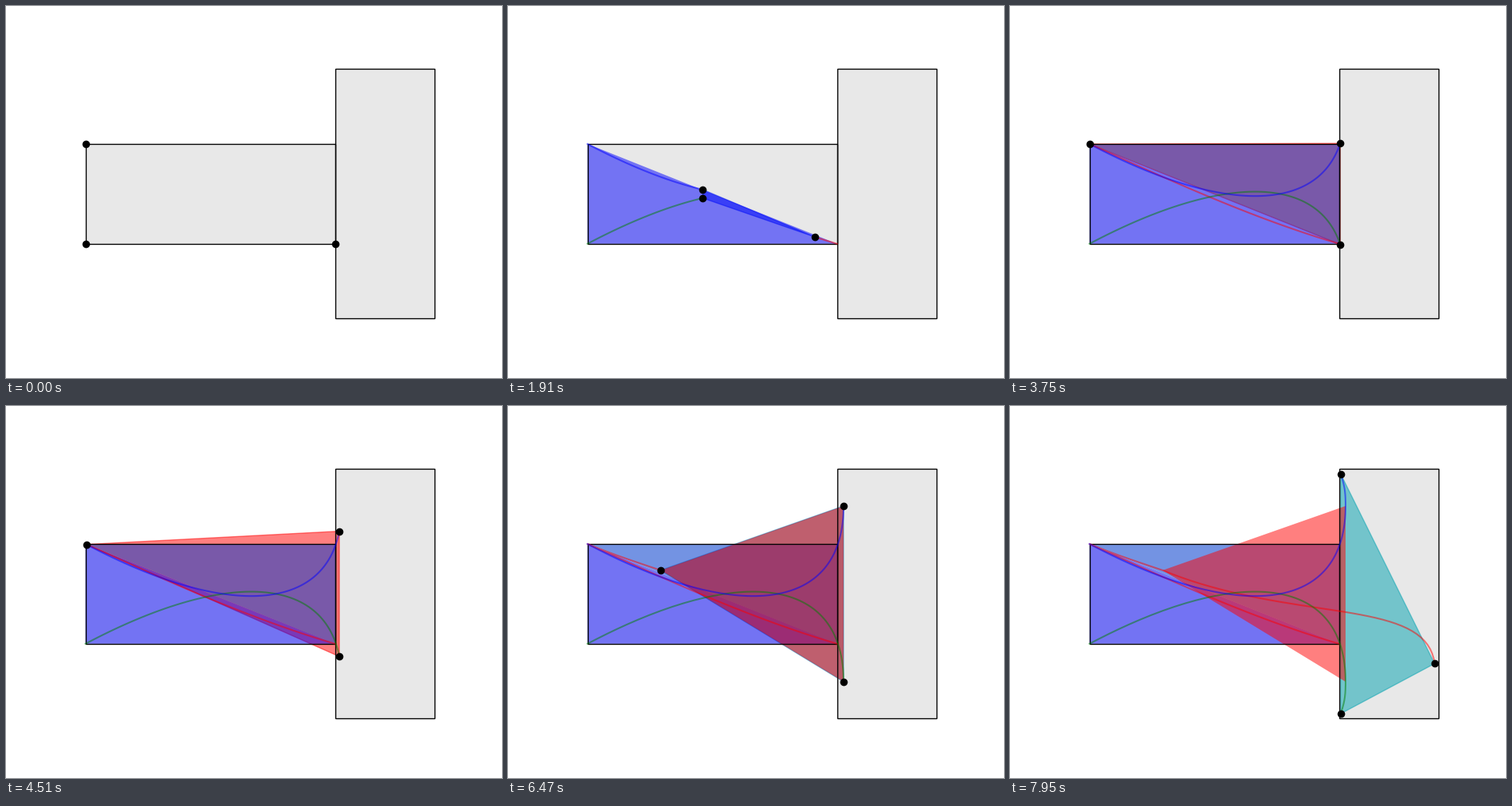
Animation, 640 px wide and 480 px high, one loop 7990 ms. Source, as a matplotlib script:

```python
import numpy as np
import matplotlib.pyplot as plt
from matplotlib.animation import FuncAnimation
from matplotlib.patches import Polygon, Rectangle

W, H = 640, 480
LOOP, TICK, STEP = 7990, 10, 40
FADE_END, MOVE_START = 360, 910
STAGE, STAGES = 70, 4            # steps per stage, stages in the full run
UNIT = 496 / 7.7
LEFT, MID = 80 + 0.35 * UNIT, 242.4
GREY = "#e8e8e8"


def px(x, y):
    """Plan coordinates to stage pixels."""
    return LEFT + x * UNIT, MID + (1 - y) * UNIT


def ease(keys, phases, at):
    """Monotone smooth curve through a few (key, phase) points."""
    keys, phases = np.array(keys), np.array(phases)
    h = np.diff(keys)
    s = np.diff(phases) / h
    m = np.r_[0, 2 * s[:-1] * s[1:] / (s[:-1] + s[1:]), s[-1]]
    i = np.clip(np.searchsorted(keys, at, "right") - 1, 0, len(h) - 1)
    u = (at - keys[i]) / h[i]
    rise = u * u * (3 - 2 * u)
    bend = u * (1 - u) * ((1 - u) * m[i] - u * m[i + 1])
    return phases[i] + rise * h[i] * s[i] + bend * h[i]


def bezier_chain(points, phase):
    """Cubic curves joined end to end; each takes one unit of phase."""
    p = np.array(points, float)
    i = np.clip(phase.astype(int), 0, (len(p) - 1) // 3 - 1)
    t = (phase - i)[:, None]
    a, b, c, d = (p[3 * i + n] for n in range(4))
    return ((1 - t)**3 * a + 3 * t * (1 - t)**2 * b
            + 3 * t**2 * (1 - t) * c + t**3 * d)


steps = np.arange((LOOP - MOVE_START) // STEP + 1)
keys = (0, 26, 58, STAGE, 91, 2 * STAGE, 177)
top = bezier_chain(
    [(0, 2), (3, 0.41), (5.13, 0.616), (5.13, 2.76),
     (5.13, 3.1), (5.1, 3.2), (5, 3.5)],
    ease(keys, (0, 0.283, 0.72, 0.86, 0.915, 1, 1.88), steps))
low = top * [1, -1] + [0, 2]
tip = bezier_chain(
    [(5, 0), (3.3, 0.5), (1.7, 1.23), (0, 2),
     (0.5, 1.79), (1, 1.63), (1.466, 1.472),
     (4.2, 0.35), (7, 1), (6.92, -0.6)],
    ease(keys, (0, 0.087, 0.94, 1, 1.015, 2, 2.955), steps))
tracks = [np.column_stack(px(*track.T)) for track in (tip, low, top)]
winter = plt.get_cmap("winter")

fig = plt.figure(figsize=(W / 100, H / 100), dpi=100, facecolor="white")
ax = fig.add_axes([0, 0, 1, 1])
ax.set_xlim(0, W)
ax.set_ylim(H, 0)
ax.axis("off")

for x, y, w, h in ((0, 0, 5, 2), (5, -1.5, 2, 5)):
    box = (px(x, y + h), w * UNIT, h * UNIT)
    ax.add_patch(Rectangle(*box, fc=GREY, ec="none", zorder=1))
    ax.add_patch(Rectangle(*box, fc="none", ec="black", lw=1, zorder=1.8))


def triangle(points, color, width, z):
    return ax.add_patch(Polygon(points, closed=True, color=color, lw=width,
                                alpha=0.5, zorder=z))


mover = triangle([t[0] for t in tracks], "blue", 1, 1.1)
first = triangle([px(0, 0), px(0, 2), px(5, 0)], "blue", 0, 1.2)
second = triangle([px(0, 2), px(5, 2), px(5, 0)], winter(1 / STAGES), 0, 1.3)
third = triangle([t[2 * STAGE] for t in tracks], "red", 0, 1.4)

trails = [ax.plot([], [], color=c, lw=1.5, alpha=0.5, zorder=2)[0]
          for c in ("red", "green", "blue")]
dots, = ax.plot([], [], "ko", ms=6, zorder=3)


def draw(frame):
    t = frame * TICK
    k = 0 if t < MOVE_START else (t - MOVE_START) // STEP + 1
    k = min(k, len(steps) - 1)
    fade = 0.5 * min(1, t // STEP * STEP / FADE_END)
    corners = np.array([track[k] for track in tracks])

    outside = STAGE <= k < 2 * STAGE
    mover.set_xy(corners)
    mover.set_color("red" if outside else winter(k / (STAGE * STAGES)))
    mover.set_alpha(fade)
    first.set_alpha(fade)
    second.set_visible(k >= STAGE)
    third.set_visible(k >= 2 * STAGE)
    for line, track in zip(trails, tracks):
        line.set_data(*track[:k + 1 if k else 0].T)
    dots.set_data(*corners.T)
    return [mover, first, second, third, *trails, dots]


anim = FuncAnimation(fig, draw, frames=LOOP // TICK, interval=TICK,
                     repeat=True, repeat_delay=0)
plt.show()
```
